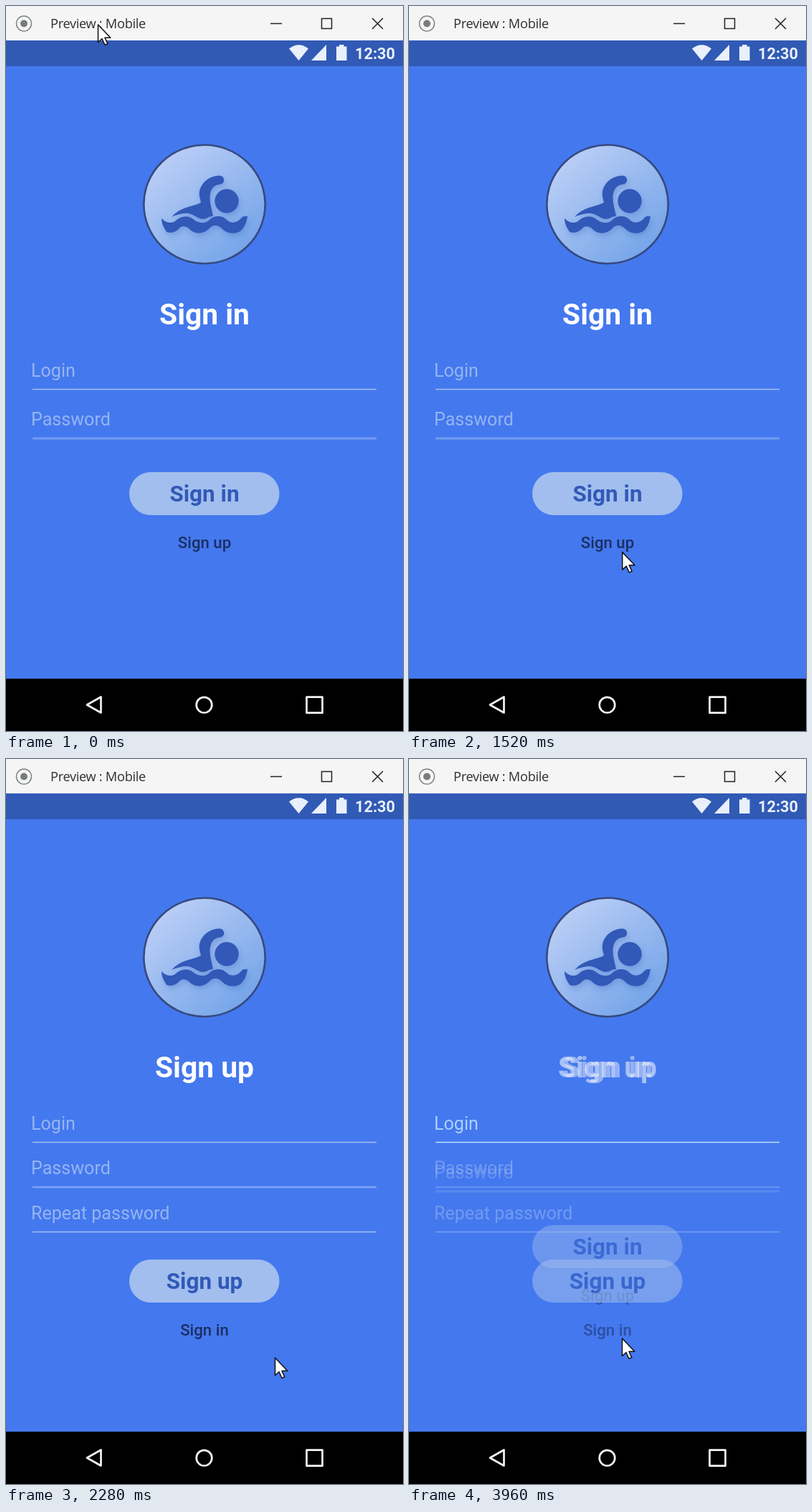
Recreate the animation shown at these times as an HTML page. Size 554 by 1011 pixels, loop 4 s.

```html
<!DOCTYPE html>
<html lang="en">
<head>
<meta charset="utf-8">
<title>Preview : Mobile</title>
<style>
html, body { margin: 0; width: 100%; height: 100%; overflow: hidden; background: #4478ee; }
svg { display: block; width: 100%; height: 100%; font-family: Roboto, sans-serif; }
.title { font-size: 40.8px; font-weight: 700; fill: #fbfcff; text-anchor: middle; }
.label { font-size: 25.1px; fill: #95b5f1; }
.cta { font-size: 31.5px; font-weight: 600; fill: #3159b7; text-anchor: middle; }
.link { font-size: 22.2px; font-weight: 500; fill: #1b2f63; text-anchor: middle; }
</style>
</head>
<body>
<svg viewBox="0 0 554 1011">
  <defs>
    <linearGradient id="badge" x1="0.12" y1="0.1" x2="0.88" y2="0.95">
      <stop offset="0" stop-color="#bccff6"/>
      <stop offset="1" stop-color="#71a2e8"/>
    </linearGradient>
    <filter id="soft" x="-20%" y="-20%" width="140%" height="150%">
      <feDropShadow dx="2" dy="4" stdDeviation="4" flood-color="#3159b7" flood-opacity="0.3"/>
    </filter>
  </defs>

  <rect width="554" height="1011" fill="#4478ee"/>

  <!-- window bar -->
  <rect width="554" height="48" fill="#f5f5f5"/>
  <circle cx="25" cy="24.5" r="10.5" fill="none" stroke="#808583" stroke-width="1.5"/>
  <circle cx="25" cy="24.5" r="5" fill="#777c7a"/>
  <text x="62" y="31" font-family="Open Sans, sans-serif" font-size="18.2" letter-spacing="-0.3" fill="#303030">Preview : Mobile</text>
  <path d="M369 24.5H385M440.5 17.5H454.5V31.5H440.5ZM511 17L526 32M526 17L511 32" fill="none" stroke="#222" stroke-width="1.5"/>

  <!-- status bar -->
  <rect y="48" width="554" height="36" fill="#315ab5"/>
  <g fill="#e9effb">
    <path d="M395 59.5Q408.500 49 422 59.500L408.500 76Z"/>
    <path d="M426 76H447V54Z"/>
    <path d="M461 56.500H465V54H471.500V56.500H475.500V76H461Z"/>
    <text x="487" y="73.500" font-size="21.700" font-weight="600">12:30</text>
  </g>

  <!-- badge -->
  <ellipse cx="277" cy="276.500" rx="84.700" ry="82.700" fill="url(#badge)" stroke="#364a7e" stroke-width="2.600"/>
  <g fill="#3059b8" filter="url(#soft)">
    <circle cx="308" cy="272" r="16.700"/>
    <path d="M297 236.500C285 237 273 245 270 258C269 265 271 269 272 274C262 280 245 279 231 294C238 291 246 289 253 289C263 290 267 297 275 297C280 297 283 293 289 293C287 282 283 272 285 262C287 252 293 249 300 248.500C307 246 305 236 297 236.500Z"/>
    <path d="M217 296C222 302 231 304 236 300C243 293 253 291 261 297C268 303 277 304 283 299C290 291 302 291 309 299C316 305 325 300 328 296C331 292 334 294 337 293C336 302 332 310 327 314C318 319 308 317 302 311C296 305 289 304 283 311C274 319 263 318 256 311C250 306 245 306 241 311C236 316 229 317 224 315C221 310 217 304 217 296Z"/>
  </g>

  <g id="login">
    <text class="label" x="35" y="517">Login</text>
    <path d="M37 534.500H517" stroke="#a3c0f1" stroke-width="1.600"/>
  </g>
  <g id="signIn"></g>
  <g id="signUp"></g>

  <!-- navigation bar -->
  <rect y="938" width="554" height="73" fill="#000"/>
  <g fill="none" stroke="#f4f4f4" stroke-width="2.700" stroke-linejoin="round">
    <path d="M113 974.500L132.500 963.500V985.500Z"/>
    <circle cx="276.500" cy="974.700" r="10.800"/>
    <rect x="419.500" y="963.700" width="22" height="22"/>
  </g>

  <path id="cursor" d="M0 0V24.500L5.500 19.500L9.500 28.300L13.300 26.600L9.500 18.200H17.300Z" fill="#fff" stroke="#111" stroke-width="1.500" stroke-linejoin="round"/>
</svg>
<script>
const LOOP = 4000, STEP = 40;
const el = id => document.getElementById(id);
const clamp = v => Math.max(0, Math.min(1, v));

const field = (name, y) => `<text class="label" x="35" y="${y}">${name}</text>`;
const rule = (y, w, color) => `<path d="M37 ${y}H517" stroke="${color}" stroke-width="${w}"/>`;
const actions = (main, other, y) =>
  `<text class="link" x="277" y="${y + 106}">${other}</text>
   <rect x="172" y="${y}" width="209.500" height="60" rx="30" fill="#a1beee"/>
   <text class="cta" x="277" y="${y + 40.5}">${main}</text>`;
const heading = s => `<text class="title" x="277" y="444">${s}</text>`;

el("signIn").innerHTML = heading("Sign in") + field("Password", 585) +
  rule(603, 2.8, "#739df1") + actions("Sign in", "Sign up", 650);
el("signUp").innerHTML = heading("Sign up") + field("Password", 579) +
  rule(597, 2.4, "#7ea5f2") + field("Repeat password", 642) +
  rule(659.5, 1.6, "#a3c0f1") + actions("Sign up", "Sign in", 698);

// pointer stops: time, x, y
const stops = [
  [0, 128.500, 26], [200, 372, 948], [320, 378.500, 907], [560, 378.500, 907],
  [1080, 298.500, 775], [1160, 298.500, 774], [1680, 297.500, 758], [1920, 297.500, 758],
  [2280, 375.500, 835], [2560, 374, 843], [2840, 369, 842], [3160, 361.500, 838],
  [3400, 300, 811], [3520, 297.500, 808], [LOOP, 297.500, 808]
];

function pointer(t) {
  const i = stops.findIndex((s, k) => k && t <= s[0]);
  const [a, b] = [stops[i - 1], stops[i]];
  const p = (t - a[0]) / (b[0] - a[0]);
  const e = p * p * (3 - 2 * p);
  return [1, 2].map(k => a[k] + (b[k] - a[k]) * e);
}

function draw(t) {
  const up = clamp((t - 1800) / 105) - clamp((t - 3920) / 90);
  const fading = up > 0 && up < 1;
  el("signUp").setAttribute("opacity", up);
  el("signIn").setAttribute("opacity", 1 - up);
  el("login").style.filter = fading ? "brightness(1.15)" : "none";
  el("cursor").setAttribute("transform", `translate(${pointer(t)})`);
}

function tick() {
  draw(Math.floor(performance.now() % LOOP / STEP) * STEP);
  requestAnimationFrame(tick);
}
tick();
</script>
</body>
</html>
```
